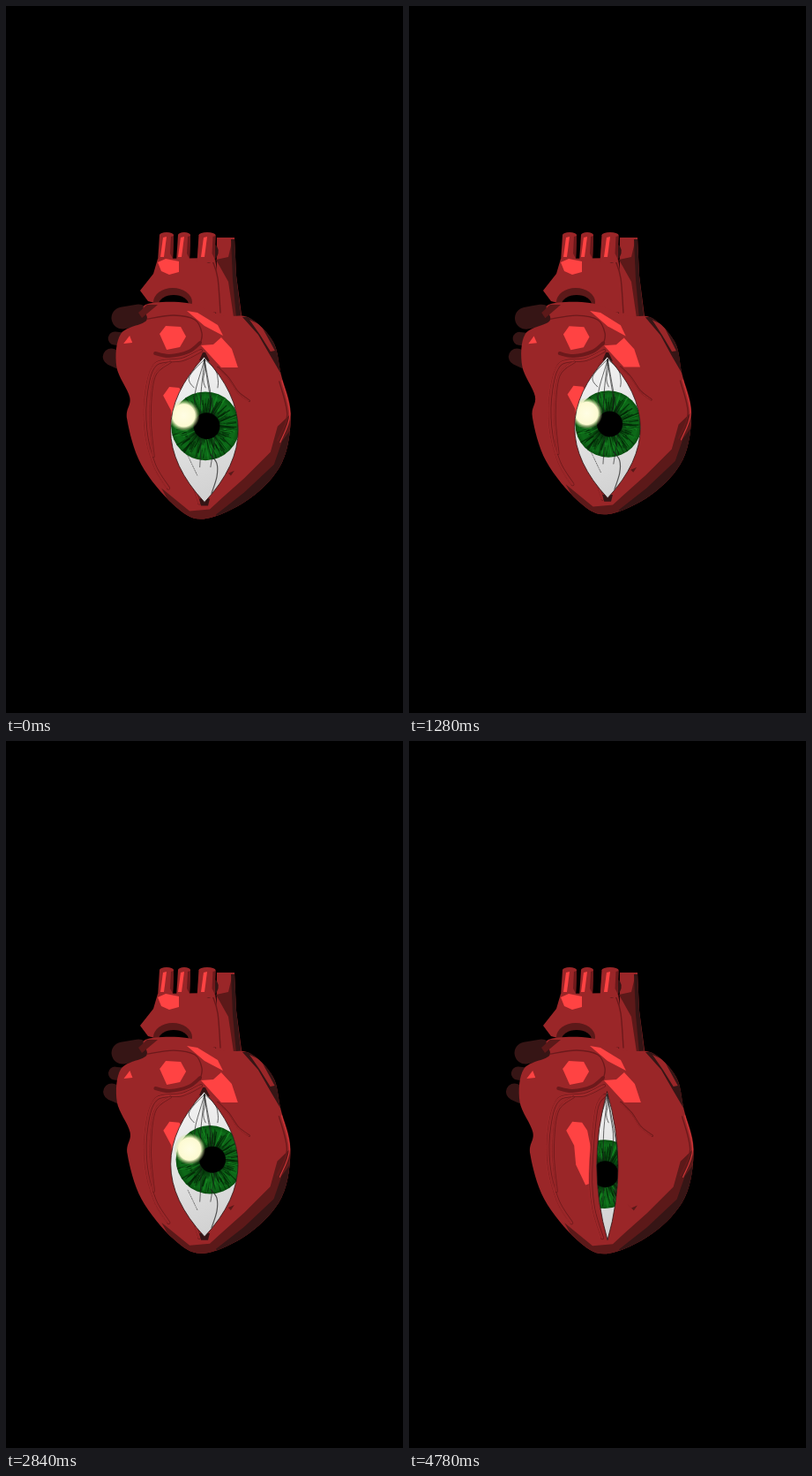
Recreate the animation shown at these times as an HTML page with a canvas. Size 450 by 800 pixels, loop 4.8 s.

```html
<!DOCTYPE html>
<html lang="en">
<head>
<meta charset="utf-8">
<title>Beating heart</title>
<style>
html, body { margin: 0; width: 100%; height: 100%; overflow: hidden; background: #000; }
canvas { display: block; width: 450px; height: 800px; }
</style>
</head>
<body>
<canvas id="stage" width="450" height="800"></canvas>
<script>
const ctx = document.getElementById('stage').getContext('2d');
const LOOP = 4800, BEAT = 960, TAU = Math.PI * 2;
const RED = '#9a2628', LIT = '#ff4343', SHADE = '#5c1919', DEEP = '#361515', EDGE = '#6c191b';

const ease = (a, b, v) => {
  const u = Math.min(1, Math.max(0, (v - a) / (b - a)));
  return u * u * (3 - 2 * u);
};

let seed = 7;
const rand = () => (seed = (seed * 16807) % 2147483647) / 2147483647;
const spread = n => (rand() - .5) * n;

const fibres = Array.from({ length: 170 }, (_, i) => ({
  a: i / 170 * TAU + spread(.04), bend: spread(.16),
  r0: 13 + rand() * 13, r1: 25 + rand() * 14, w: .4 + rand() * 1.1, dark: rand() < .72
}));

// Thin veins fan out from the upper corner of the eye.
const veins = Array.from({ length: 7 }, (_, i) => ({
  slant: (i - 3) * 5.5, reach: 32 + (i % 3) * 45, phase: rand() * TAU
}));

// The ventricles swell about a fixed point; the great vessels stay still.
let squeeze = 1;
function warp([x, y]) {
  const k = 1 + (squeeze - 1) * ease(335, 405, y);
  return [230 + (x - 230) * k, 395 + (y - 395) * k];
}

function trace(points, smooth, closed) {
  const p = points.map(warp), n = p.length;
  const at = i => closed ? p[(i + n) % n] : p[Math.min(n - 1, Math.max(0, i))];
  ctx.beginPath();
  ctx.moveTo(...p[0]);
  for (let i = 0; i < (closed ? n : n - 1); i++) {
    const a = at(i - 1), b = at(i), c = at(i + 1), d = at(i + 2);
    if (smooth) {
      ctx.bezierCurveTo(b[0] + (c[0] - a[0]) / 6, b[1] + (c[1] - a[1]) / 6,
        c[0] - (d[0] - b[0]) / 6, c[1] - (d[1] - b[1]) / 6, ...c);
    } else ctx.lineTo(...c);
  }
  if (closed) ctx.closePath();
}

function fill(color, points, smooth = false) {
  trace(points, smooth, true);
  ctx.fillStyle = color;
  ctx.fill();
}

function line(color, width, points) {
  trace(points, true, false);
  ctx.strokeStyle = color;
  ctx.lineWidth = width;
  ctx.stroke();
}

function blob(color, x, y, rx, ry = rx, turn = 0) {
  ctx.beginPath();
  ctx.ellipse(x, y, rx, ry, turn, 0, TAU);
  ctx.fillStyle = color;
  ctx.fill();
}

// Raised vessel: dark rim, body colour, bright left side.
function vessel(width, points) {
  line(EDGE, width, points);
  line(RED, width - 1.5, points);
  line('#b52e30', .6, points.map(([x, y]) => [x - width / 2, y]));
}

function drawArteries() {
  fill(RED, [[239, 262], [259, 262], [261, 305], [268, 357], [238, 357]]);
  fill(SHADE, [[238, 287], [252, 284], [257, 263], [260, 305], [267, 355], [258, 352], [252, 312]]);
  fill(DEEP, [[255, 264], [259, 264], [261, 305], [267, 355], [261, 352], [257, 310]]);

  fill(RED, [[172, 286], [237, 285], [240, 308], [244, 347], [206, 346], [161, 334], [152, 322], [167, 303]]);
  line(EDGE, 1.4, [[234, 288], [240, 308], [243, 347]]);
  blob(DEEP, 232, 280, 8, 11, .5);
  for (const [x, w] of [[182, 16], [202, 14], [228, 19]]) {
    fill(RED, [[x - w / 2, 259], [x + w / 2, 259], [x + w / 2 - 1, 290], [x - w / 2 - 2, 290]]);
    blob(RED, x, 259, w / 2, 3);
    fill(EDGE, [[x + w / 2 - 3, 261], [x + w / 2, 260], [x + w / 2 - 1, 286], [x + w / 2 - 4, 280]]);
    fill(LIT, [[x - 4, 262], [x, 261], [x - 3, 284], [x - 7, 284]]);
  }
  fill(LIT, [[172, 290], [181, 286], [196, 289], [196, 301], [185, 304], [176, 300]]);
  blob(SHADE, 189, 335, 22, 16);
  blob('#000', 190, 338, 17, 11);
}

function drawPulmonary() {
  line(DEEP, 25, [[132, 353], [150, 350]]);
  line(DEEP, 15, [[123, 376], [132, 377]]);
  line(DEEP, 19, [[119, 397], [130, 402]]);
}

function drawBody() {
  const outline = [[158, 338], [205, 336], [246, 350], [276, 353], [303, 380], [312, 417], [323, 462],
    [313, 517], [276, 558], [224, 581], [190, 565], [153, 519], [137, 468], [140, 443], [125, 408], [130, 371], [159, 356]];
  fill(RED, outline, true);

  ctx.save();
  trace(outline, true, true);
  ctx.clip();
  fill(SHADE, [[330, 455], [308, 476], [300, 505], [270, 535], [244, 558], [231, 570], [208, 572], [176, 546], [200, 590], [330, 590]]);
  fill(DEEP, [[330, 470], [313, 493], [304, 519], [270, 551], [238, 576], [245, 590], [330, 590]]);
  fill(DEEP, [[268, 352], [286, 372], [300, 396], [320, 430], [320, 380], [290, 350]]);
  fill(RED, [[276, 355], [289, 361], [305, 390], [300, 391], [288, 372]]);
  ctx.restore();
  fill(SHADE, [[160, 338], [172, 338], [154, 353], [150, 347]]);

  // auricle
  line(EDGE, 4, [[169, 393], [185, 396], [207, 391], [220, 381]]);
  line(EDGE, 1.3, [[160, 354], [190, 350], [214, 355], [222, 370], [220, 383]]);

  fill(LIT, [[174, 371], [181, 362], [198, 363], [204, 374], [197, 386], [182, 389]]);
  fill(LIT, [[133, 382], [140, 373], [143, 381]]);
  fill(LIT, [[205, 345], [217, 347], [240, 361], [246, 373], [225, 362]]);
  fill(LIT, [[221, 384], [235, 383], [244, 375], [256, 388], [263, 409], [244, 409], [232, 396]]);
  fill(LIT, [[178, 441], [185, 431], [196, 432], [202, 441], [207, 466], [208, 500], [200, 503], [189, 480], [187, 458]]);

  vessel(4, [[221, 390], [200, 400], [170, 405], [159, 435], [158, 480], [168, 520], [184, 546]]);
  vessel(3, [[186, 403], [168, 419], [163, 465], [167, 510]]);
  vessel(4, [[222, 401], [212, 418], [206, 490], [209, 530], [219, 563]]);
  vessel(2.4, [[240, 409], [252, 421], [263, 437], [276, 447]]);
  line('#d23638', 1.1, [[313, 424], [322, 463], [311, 494]]);
  line(EDGE, 1.4, [[310, 425], [319, 463], [308, 492]]);
  fill(SHADE, [[247, 524], [252, 529], [259, 526], [255, 532]]);
}

function drawIris(x, y, k) {
  ctx.save();
  ctx.translate(x, y);
  ctx.scale(k, k);
  const g = ctx.createRadialGradient(0, 0, 12, 0, 0, 39);
  g.addColorStop(0, '#052c09');
  g.addColorStop(.4, '#0b6015');
  g.addColorStop(.8, '#0d6a18');
  g.addColorStop(1, '#08500f');
  blob(g, 0, 0, 39);
  for (const f of fibres) {
    ctx.strokeStyle = f.dark ? 'rgba(0,28,4,.62)' : 'rgba(24,140,36,.6)';
    ctx.lineWidth = f.w;
    ctx.beginPath();
    ctx.moveTo(Math.cos(f.a) * f.r0, Math.sin(f.a) * f.r0);
    ctx.lineTo(Math.cos(f.a + f.bend) * f.r1, Math.sin(f.a + f.bend) * f.r1);
    ctx.stroke();
  }
  ctx.restore();
}

function drawVeins() {
  for (const v of veins) {
    const points = Array.from({ length: 7 }, (_, i) => {
      const u = i / 6;
      return [225 + v.slant * Math.sin(u * 2.2) + 2 * u * Math.sin(v.phase + u * 7), 400 + v.reach * u];
    });
    line('rgba(30,30,30,.65)', 1, points);
  }
  line('rgba(30,30,30,.7)', 1.2, [[232, 508], [239, 518], [239, 533], [233, 552]]);
  ctx.setLineDash([1.2, 1.4]);
  line('#666', .9, [[206, 509], [217, 532]]);
  ctx.setLineDash([]);
}

function drawGlint(x, y, alpha) {
  const g = ctx.createRadialGradient(x, y, 0, x, y, 18);
  g.addColorStop(0, '#fffde4');
  g.addColorStop(.7, '#fdfad2');
  g.addColorStop(1, 'rgba(190,220,130,0)');
  ctx.globalAlpha = alpha;
  blob(g, x, y, 18);
}

function drawEye(t) {
  const open = 1 - ease(4600, 4888, t);
  const right = ease(2500, 3100, t) - ease(3500, 4060, t);
  const down = ease(4250, 4740, t);
  const gx = 11 * right - 5 * down;
  const gy = -2 * right + 6 * ease(3500, 4060, t) + 9 * down;

  const top = warp([224.5, 397]), end = warp([225, 567 - 5 * open]);
  const half = 38.5 * squeeze * open, mid = (top[1] + end[1]) / 2;
  const lens = () => {
    ctx.beginPath();
    ctx.moveTo(...top);
    ctx.quadraticCurveTo(225 - half * 2, mid, ...end);
    ctx.quadraticCurveTo(225 + half * 2, mid, ...top);
  };

  if (open > .5) {
    fill(DEEP, [[219, 401], [223, 392], [226, 392], [231, 402]]);
    fill(DEEP, [[219, 558], [231, 558], [229, 566], [221, 566]]);
  }
  ctx.save();
  lens();
  ctx.clip();
  const white = ctx.createLinearGradient(195, 420, 250, 560);
  white.addColorStop(0, '#f0f0f0');
  white.addColorStop(1, '#cfcfcf');
  ctx.fillStyle = white;
  ctx.fillRect(180, 390, 90, 190);

  const [cx, cy] = warp([227.5, 475.5]);
  const px = cx + gx, py = cy + gy;
  drawIris(cx - 1.5 + gx * .8, py, squeeze);
  drawVeins();
  blob('#000', px, py, 15 * squeeze);
  drawGlint(px - 26, py - 12, ease(.3, .8, open));
  ctx.restore();

  lens();
  ctx.strokeStyle = '#2c1010';
  ctx.lineWidth = .8;
  ctx.stroke();
}

function draw(t) {
  const swell = Math.cos(TAU * (t / BEAT - .07));
  squeeze = 1 - .029 * (1 - swell);
  ctx.fillStyle = '#000';
  ctx.fillRect(0, 0, 450, 800);
  ctx.lineCap = ctx.lineJoin = 'round';
  drawArteries();
  drawPulmonary();
  drawBody();
  drawEye(t);
}

const start = performance.now();
function tick() {
  const t = (performance.now() - start) % LOOP;
  draw(Math.floor(t / 20) * 20);
  requestAnimationFrame(tick);
}
tick();
</script>
</body>
</html>
```
